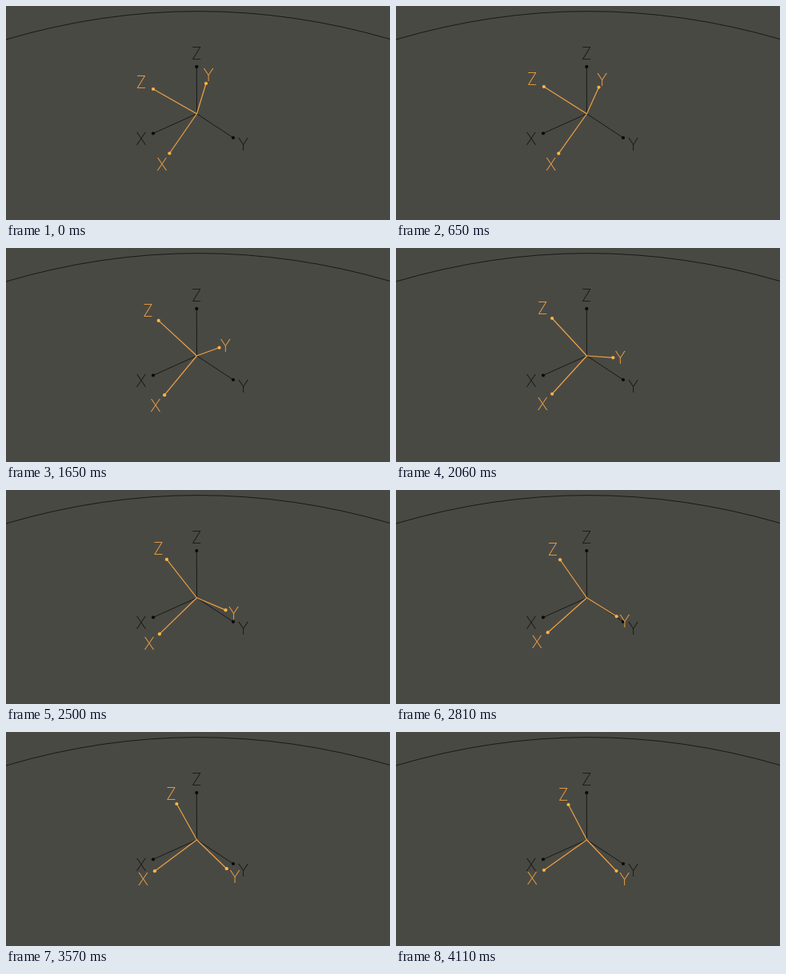
Write an HTML page with a canvas that moves like this. It is 480 px wide and 268 px high and loops after 4.14 s.

```html
<!DOCTYPE html>
<html lang="en">
<head>
<meta charset="utf-8">
<title>Rotating axes</title>
<style>
  html, body { margin: 0; width: 100%; height: 100%; overflow: hidden; background: #494944; }
  canvas { display: block; }
</style>
</head>
<body>
<canvas id="stage" width="480" height="268"></canvas>
<script>
const ctx = document.getElementById('stage').getContext('2d');
const LOOP = 4140, POSES = 121;
const CENTER = [238.5, 135];
const LABEL_REACH = 1.275;
const GROUND = '#494944', DARK = '#181816', ORANGE = '#eda243';

const fixedAxes = { X: [184, 159.5], Y: [284, 165], Z: [238.3, 76] };

// Tip coordinates as polynomials of the eased progress, lowest power first
const turningAxes = {
  X: [[204.4, -17.6, -1.8], [184.5, 4.5, -16]],
  Y: [[250, 59.7, -34.2], [97, 78, 11.5, -12.5]],
  Z: [[184, 13, 18.5], [104, -51, 38]]
};

const poly = (coeffs, s) => coeffs.reduceRight((sum, c) => sum * s + c, 0);

function drawAxis(name, [x, y], color, dotColor, width) {
  const [cx, cy] = CENTER;
  ctx.strokeStyle = color;
  ctx.lineWidth = width;
  ctx.beginPath();
  ctx.moveTo(cx, cy);
  ctx.lineTo(x, y);
  ctx.stroke();

  ctx.fillStyle = dotColor;
  ctx.beginPath();
  ctx.arc(x, y, 2.1, 0, 2 * Math.PI);
  ctx.fill();

  ctx.fillStyle = color;
  ctx.fillText(name, cx + (x - cx) * LABEL_REACH, cy + (y - cy) * LABEL_REACH + 7.5);
}

function drawHorizon() {
  ctx.strokeStyle = DARK;
  ctx.lineWidth = 1;
  ctx.beginPath();
  ctx.moveTo(0, 42);
  ctx.quadraticCurveTo(239, -28.5, 480, 41.5);
  ctx.stroke();
}

// The turn advances in equal steps, from the first pose to the last, then restarts
function easedProgress(time) {
  const pose = Math.floor(time % LOOP / LOOP * POSES);
  return (1 - Math.cos(Math.PI * pose / (POSES - 1))) / 2;
}

function draw(time) {
  const s = easedProgress(time);
  ctx.fillStyle = GROUND;
  ctx.fillRect(0, 0, 480, 268);
  ctx.font = '200 21px Inter, Lato, sans-serif';
  ctx.textAlign = 'center';
  drawHorizon();
  for (const name in fixedAxes) drawAxis(name, fixedAxes[name], DARK, '#080808', 1);
  for (const name in turningAxes) {
    drawAxis(name, turningAxes[name].map(c => poly(c, s)), ORANGE, '#ffb545', 1.2);
  }
}

const start = performance.now();
function tick() {
  draw(performance.now() - start);
  requestAnimationFrame(tick);
}
tick();
</script>
</body>
</html>
```
